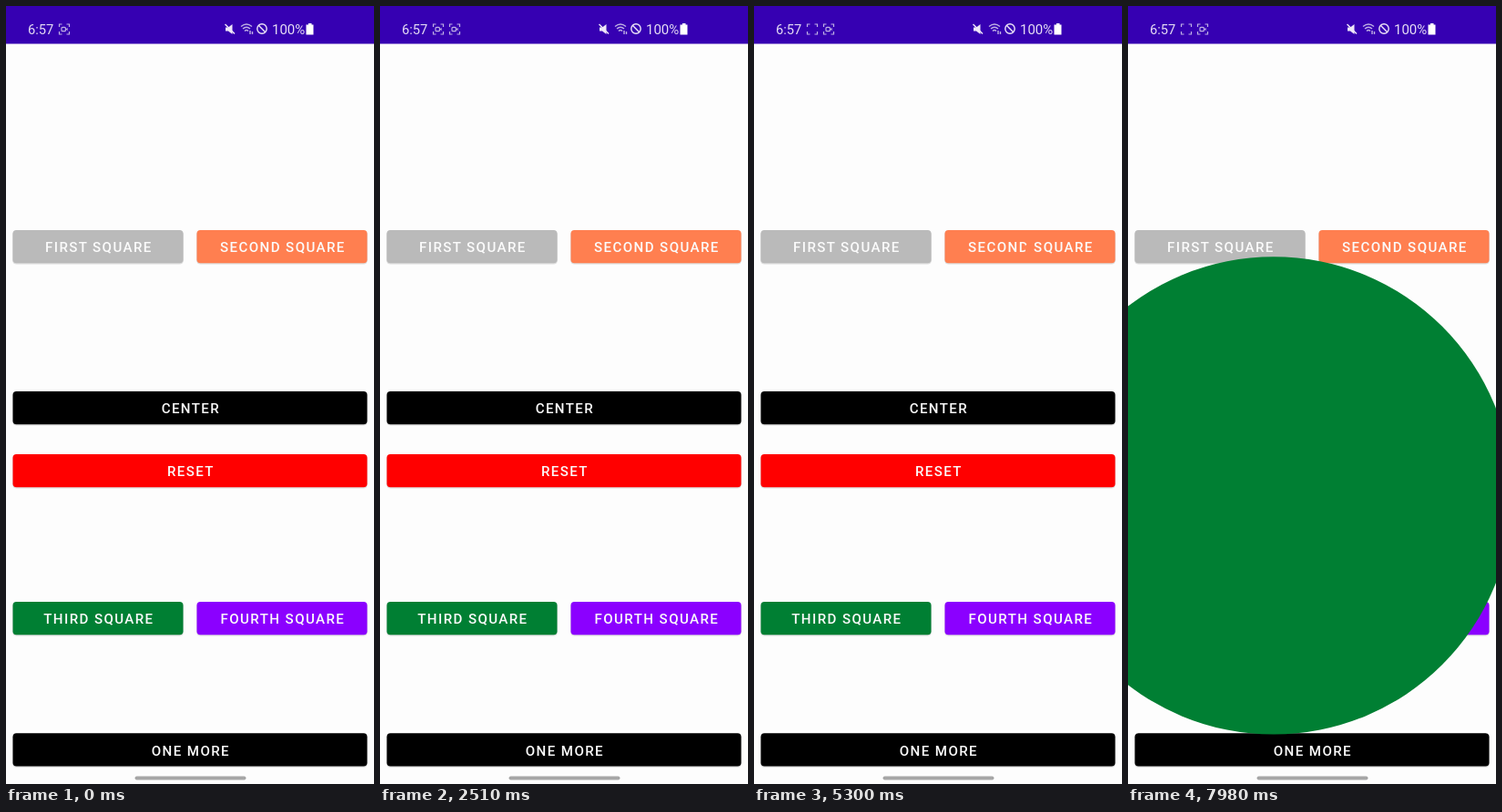
An HTML page for the animation above (8000 ms loop, 404 by 854 pixels).

```html
<!DOCTYPE html>
<html lang="en">
<head>
<meta charset="utf-8">
<title>Circle reveal buttons</title>
<style>
  html, body { margin: 0; width: 100%; height: 100%; overflow: hidden; background: #fdfdfd; }
  svg { display: block; width: 100%; height: 100%; }
  text { font-family: Roboto, sans-serif; }
  .label { font-size: 15.1px; font-weight: 500; letter-spacing: 1.4px; text-anchor: middle; fill: #fbfbfb; }
  .status { font-size: 15px; fill: #e6dcf4; }
</style>
</head>
<body>
<svg viewBox="0 0 404 854" preserveAspectRatio="none">
  <defs>
    <clipPath id="content"><rect y="41" width="404" height="800"/></clipPath>
    <g id="corners" fill="none" stroke="#bfb0e4" stroke-width="1.2">
      <path d="M-5.5-2.5V-5.5H-2.5M2.5-5.5H5.5V-2.5M5.5 2.5V5.5H2.5M-2.5 5.5H-5.5V2.5"/>
    </g>
    <g id="lens" fill="none" stroke="#bfb0e4" stroke-width="1.2">
      <rect x="-3" y="-2.2" width="4.4" height="4.4" rx="1"/>
      <path d="M1.6 0L3.6-1.8V1.8Z" fill="#bfb0e4" stroke="none"/>
    </g>
  </defs>
  <rect width="404" height="854" fill="#fdfdfd"/>
  <g id="buttons"></g>
  <g clip-path="url(#content)"><circle id="burst"/></g>

  <rect width="404" height="41.5" fill="#3600b2"/>
  <text class="status" x="24" y="31" style="font-size:14.7px">6:57</text>
  <g transform="translate(64 25.5)"><use href="#corners"/><use href="#lens" id="lensA"/></g>
  <g transform="translate(82 25.5)" id="iconB"><use href="#corners"/><use href="#lens"/></g>
  <g fill="none" stroke="#eee6f8" stroke-width="1.4">
    <path d="M241 23.5H244L248.5 20V31L244 27.5H241Z" fill="#eee6f8" stroke="none"/>
    <path d="M240.5 20L251 30.5"/>
    <g stroke="#bfb0e4">
      <path d="M258 22.5Q264 17.5 270 22.5M260 25Q264 21.5 268 25M262 27.5Q264 25.5 266 27.5"/>
      <path d="M268 27V31M270.5 28V31"/>
    </g>
    <circle cx="281" cy="25" r="5.2"/>
    <path d="M277.3 21.3L284.7 28.7"/>
  </g>
  <text class="status" x="292" y="31">100%</text>
  <path d="M332 19H335.500V20.500H337.500V31.500H329.500V20.500H332Z" fill="#fff"/>
  <rect x="141.500" y="845.500" width="122" height="4" rx="2" fill="#a6a6a6"/>
</svg>
<script>
const LOOP = 8000, GROW = 700;
const END = { x: 202, y: 441 };
const GRAY = '#bababa', ORANGE = '#ff7f50', GREEN = '#007f33', PURPLE = '#8b00ff';
const $ = id => document.getElementById(id);

function add(parent, tag, attrs, text) {
  const el = document.createElementNS('http://www.w3.org/2000/svg', tag);
  for (const k in attrs) el.setAttribute(k, attrs[k]);
  if (text) el.textContent = text;
  parent.appendChild(el);
}

function button(label, x, y, width, fill) {
  const g = $('buttons');
  add(g, 'rect', { x: x - 0.5, y: y + 0.5, width: width + 1, height: 37, rx: 4.5, fill: '#dcdcdc' });
  add(g, 'rect', { x, y, width, height: 36.3, rx: 4, fill });
  add(g, 'text', { class: 'label', x: x + width / 2 + 0.9, y: y + 24.2 }, label);
}

const LEFT = 7.5, RIGHT = 209.5, HALF = 187, FULL = 389;
button('FIRST SQUARE', LEFT, 246, HALF, GRAY);
button('SECOND SQUARE', RIGHT, 246, HALF, ORANGE);
button('CENTER', LEFT, 423, FULL, '#000');
button('RESET', LEFT, 492, FULL, '#f00');
button('THIRD SQUARE', LEFT, 654, HALF, GREEN);
button('FOURTH SQUARE', RIGHT, 654, HALF, PURPLE);
button('ONE MORE', LEFT, 798.3, FULL, '#000');

// Each burst leaves its button, grows over the content, then vanishes.
const bursts = [
  { start: 957, x: 101, y: 264, r: 450, fill: GRAY },
  { start: 2850, x: 303, y: 672, r: 492, fill: PURPLE },
  { start: 5255, x: 303, y: 264, r: 450, fill: ORANGE },
  { start: 7594, x: 101, y: 672, r: 450, fill: GREEN }
];

const ease = u => (1 - Math.cos(Math.PI * u)) / 2;
const mix = (a, b, p) => a + (b - a) * p;
const show = (id, on) => $(id).setAttribute('visibility', on ? 'visible' : 'hidden');

function draw(t) {
  const b = bursts.find(b => t >= b.start && t < b.start + GROW);
  show('burst', b);
  if (b) {
    const p = ease((t - b.start) / GROW), c = $('burst');
    c.setAttribute('cx', mix(b.x, END.x, p));
    c.setAttribute('cy', mix(b.y, END.y, p));
    c.setAttribute('r', b.r * p);
    c.setAttribute('fill', b.fill);
  }
  show('iconB', t >= 60);
  show('lensA', t < 4950 || (t >= 6530 && t < 6990));
}

const t0 = performance.now();
function tick() {
  draw((performance.now() - t0) % LOOP);
  requestAnimationFrame(tick);
}
tick();
</script>
</body>
</html>
```
